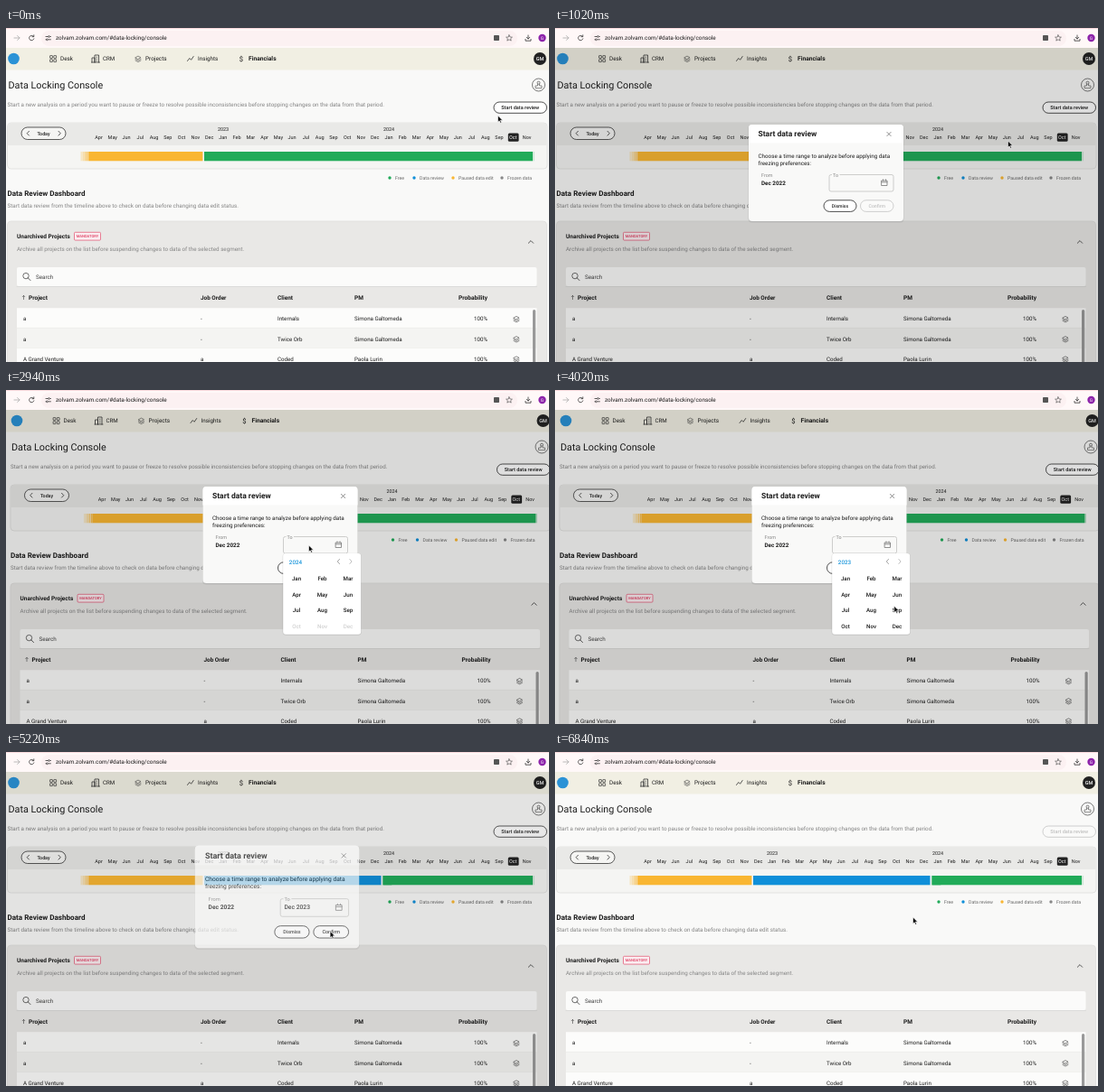
An HTML page for the animation above (6.9 s loop, 600 by 370 pixels).

```html
<!DOCTYPE html>
<html lang="en">
<head>
<meta charset="utf-8">
<title>Data Locking Console</title>
<style>
html, body { margin: 0; width: 100%; height: 100%; overflow: hidden; background: #f9f9f8; }
svg { display: block; width: 600px; height: 370px; font-family: Roboto, Inter, sans-serif; text-rendering: geometricPrecision; }
text { fill: #1c1c1c; white-space: pre; }
.m { font-weight: 500; }
.b { font-weight: 700; }
.c { text-anchor: middle; }
.e { text-anchor: end; }
text.g { fill: #858585; }
.l { fill: none; stroke: #333; stroke-width: .8; stroke-linecap: round; stroke-linejoin: round; }
.thin { stroke: #444; stroke-width: .6; }
</style>
</head>
<body>
<svg id="stage" viewBox="0 0 600 370"></svg>
<script>
const LOOP = 6900;
const MONTHS = 'Jan Feb Mar Apr May Jun Jul Aug Sep Oct Nov Dec'.split(' ');
const ORANGE = '#f9b632', GREEN = '#21ab59', BLUE = '#0f8fd9';

const text = (x, y, size, s, cls = '', more = '') =>
  `<text x="${x}" y="${y}" font-size="${size}" class="${cls}" ${more}>${s}</text>`;
const rect = (x, y, w, h, fill, r = 0, more = '') =>
  `<rect x="${x}" y="${y}" width="${w}" height="${h}" rx="${r}" fill="${fill}" ${more}/>`;
const circle = (x, y, r, fill, more = '') => `<circle cx="${x}" cy="${y}" r="${r}" fill="${fill}" ${more}/>`;
const line = (d, more = '', cls = '') => `<path class="l ${cls}" d="${d}" ${more}/>`;
const range = (n, f) => Array.from({ length: n }, (_, i) => f(i)).join('');
const layers = (x, y) => line(`M${x - 3} ${y - 1.3}l3 -1.6 3 1.6 -3 1.6zm0 1.7l3 1.6 3 -1.6m-6 1.6l3 1.6 3 -1.6`, '', 'thin');
const stroke = (color, w = .8) => `stroke="${color}" stroke-width="${w}"`;

function browser() {
  return rect(0, 0, 600, 22, '#fff8f8') + rect(0, 0, 600, 1, '#f8d9dd') +
    rect(39, 3, 526, 17, '#fcf1f2', 8.5) +
    line('M9 11h6m-2.4 -2.5l2.5 2.5 -2.5 2.5', 'style="stroke:#aaa"') +
    line('M30.4 9.3a2.7 2.7 0 1 0 .5 2.6M30.8 7.8v1.9h-1.9') +
    line('M44 9.5h2.4m2.4 0h.6M44 12.8h.6m2.4 0h2.4') +
    circle(47.5, 9.5, .9, 'none', stroke('#333', .7)) + circle(45.5, 12.8, .9, 'none', stroke('#333', .7)) +
    text(55, 13.3, 6.37, 'zolvam.zolvam.com/#data-locking/console') +
    rect(539, 8, 6, 6, '#555', .8) +
    line('M556 7.8l1 2.2 2.4 .2 -1.8 1.6 .6 2.3 -2.2 -1.3 -2.2 1.3 .6 -2.3 -1.8 -1.6 2.4 -.2z', '', 'thin') +
    line('M577 8v4m-1.8 -1.7l1.8 1.8 1.8 -1.8M574 12.4v1.8h6v-1.8') +
    circle(592.5, 11, 4.2, '#8d24aa') + text(592.5, 12.8, 4.8, 'G', 'c', 'style="fill:#fff"');
}

function nav() {
  const tile = i => rect(48.6 + i % 2 * 4.2, 30.6 + (i >> 1) * 4.2, 2.8, 2.8, 'none', .3, stroke('#333', .7));
  return rect(-6, 22, 612, 24.5, '#f1efe3') + circle(8.5, 34, 6.3, '#2b92d6') +
    range(4, tile) + text(60, 36.2, 6.35, 'Desk') +
    line('M95 38v-5h3v5m0 0v-8h4.5v8M94.5 38h9M100 32.2h.5m-.5 2h.5m-.5 2h.5') + text(107, 36.2, 6.2, 'CRM') +
    layers(146, 34) + text(154, 36.2, 6.45, 'Projects') +
    line('M200.5 36.5l2.3 -3 1.8 1.8 2.6 -3.8') + text(212, 36.2, 6.3, 'Insights') +
    text(260, 36.8, 7.6, '$', 'c') + text(268, 36.2, 6.7, 'Financials', 'b') +
    circle(590, 34, 7, '#222') + text(590, 36, 5.5, 'GM', 'c m', 'style="fill:#fff"');
}

function timeline() {
  const legend = [[424, 'Free', GREEN], [451, 'Data review', BLUE], [494, 'Paused data edit', ORANGE], [548, 'Frozen data', '#888']];
  return rect(1.5, 105, 596.5, 51, '#f5f5f3', 4, stroke('#dededc')) +
    '<path d="M1.9 130V109q0-3.600 3.600-3.600h588.500q3.600 0 3.600 3.600v21z" fill="#e9e9e7"/>' +
    rect(17, 110, 49, 13.5, '#f5f5f3', 6.75, stroke('#333')) +
    line('M25.5 114.3l-2.3 2.4 2.3 2.4M58 114.3l2.3 2.4 -2.3 2.4') +
    text(41.5, 118.7, 5.3, 'Today', 'm c') +
    text(240, 114.3, 5.4, '2023', 'c') + text(423, 114.3, 5.4, '2024', 'c') +
    rect(554.8, 116.5, 11.8, 9.2, '#222', 1.5) +
    range(32, i => text((102.5 + i * 15.26).toFixed(1), 122.8, 5.5, MONTHS[(i + 3) % 12], 'c', i == 30 ? 'style="fill:#fff"' : '')) +
    range(5, i => rect(82.5 + i * 2, 137, 1.5, 10.3, ORANGE, 0, `opacity="${.25 + i * .15}"`)) +
    rect(92, 137, 125.4, 10.3, ORANGE) + rect(219, 137, 363, 10.3, GREEN) +
    `<g id="review">${rect(218, 136.5, 199, 11.3, '#f5f5f3')}${rect(219, 137, 195.5, 10.3, BLUE)}${rect(416.3, 137, 10, 10.3, GREEN)}</g>` +
    rect(582.6, 137, .9, 10.3, GREEN, 0, 'opacity=".35"') +
    legend.map(([x, s, color]) => circle(x, 166, 1.7, color) + text(x + 6, 167.8, 5.2, s, '', 'style="fill:#666"')).join('');
}

function dashboard() {
  const rows = [['a', '-', 'Internals', 'Simona Galtomeda'], ['a', '-', 'Twice Orb', 'Simona Galtomeda'], ['A Grand Venture', 'a', 'Coded', 'Paola Lurin']];
  const cols = [19, 215, 300, 385];
  return text(1.5, 186, 8.1, 'Data Review Dashboard', 'b') +
    text(1.5, 199.3, 6.27, 'Start data review from the timeline above to check on data before changing data edit status.', 'g') +
    rect(1.5, 214, 596, 170, '#e9e8e6', 4, stroke('#dfdedc')) +
    text(12, 232.7, 6.5, 'Unarchived Projects', 'b') +
    rect(75.5, 226.3, 29, 8.8, '#fbeef1', 1, stroke('#e2506f', .7)) +
    text(90, 232.2, 4.1, 'MANDATORY', 'm c', 'style="fill:#df3c60"') +
    text(12, 247.4, 6.26, 'Archive all projects on the list before suspending changes to data of the selected segment.', 'g') +
    line('M577.3 238.3l2.7 -2.7 2.7 2.7') +
    rect(12, 265, 574.5, 21, '#fbfbfa', 2) +
    circle(22, 274.6, 3.2, 'none', stroke('#333', .7)) + line('M24.3 276.9l2.7 2.7') +
    text(33, 277.6, 6.3, 'Search', '', 'style="fill:#444"') +
    rect(12, 286.5, 574.5, 23.5, '#e9e8e6') + line('M12 286.5h574.5', 'style="stroke:#d8d8d6"') +
    line('M19.5 300.6v-4.2m-1.3 1.3l1.3 -1.3 1.3 1.3', '', 'thin') +
    text(25, 300.7, 6.5, 'Project', 'b') + text(215, 300.7, 6.4, 'Job Order', 'b') +
    text(300, 300.7, 6.5, 'Client', 'b') + text(385, 300.7, 6.5, 'PM', 'b') + text(532, 300.7, 6.6, 'Probability', 'b e') +
    rows.map((row, i) => {
      const y = 324.3 + i * 22.2;
      return rect(12, y - 14.1, 574.5, 22.2, i % 2 ? '#f4f4f2' : '#fcfcfb') +
        row.map((s, k) => text(cols[k], y, 6.2, s)).join('') + text(532, y, 6.2, '100%', 'e') + layers(564, y - 2) +
        line(`M12 ${y + 8.1}h570`, 'style="stroke:#e6e6e4"');
    }).join('') +
    rect(582, 312, 3.2, 64, '#999', 1.6);
}

function page() {
  return rect(-6, 40, 612, 335, '#f9f9f8') + nav() +
    text(2.5, 66.8, 10.8, 'Data Locking Console') +
    circle(588.5, 63, 7, '#f9f9f8', stroke('#444', .7)) +
    circle(588.5, 60.7, 1.5, 'none', stroke('#333', .6)) + line('M587.5 62.2v1.8h-2.5v2.6h7v-2.6h-2.5v-1.8', '', 'thin') +
    text(1.5, 86.6, 6.26, 'Start a new analysis on a period you want to pause or freeze to resolve possible inconsistencies before stopping changes on the data from that period.', 'g') +
    `<g id="start">${rect(539, 82, 58.5, 12.3, '#fff', 6.15, stroke('#222'))}${text(568.2, 90, 5.55, 'Start data review', 'm c')}</g>` +
    rect(538.5, 81.5, 59.5, 13.3, '#000', 6.6, 'id="hover"') +
    timeline() + dashboard() +
    rect(-6, 22, 612, 350, '#000', 0, 'id="shade"');
}

function modal() {
  return `<g id="modal">${rect(213.5, 107.5, 172, 108, '#000', 4, 'opacity=".08"')}` +
    rect(214, 107, 171, 107, '#f9f9f8', 4) + '<path d="M214 127.500V111q0-4 4-4h163q4 0 4 4v16.500z" fill="#fff"/>' +
    text(224.5, 120.3, 8.5, 'Start data review', 'b') +
    line('M366.9 115.4l4.2 4.2m0 -4.2l-4.2 4.2', '', 'thin') +
    text(224.5, 144.2, 6.27, 'Choose a time range to analyze before applying data') +
    text(224.5, 151.7, 6.27, 'freezing preferences:') +
    text(228, 165, 5.4, 'From', 'g') + text(228, 173.5, 6.3, 'Dec 2022', 'b') +
    rect(303, 162.5, 71, 18.5, 'none', 2, stroke('#c2c2c0')) + rect(306, 161.5, 8.5, 2, '#f9f9f8') +
    text(307, 165, 5.4, 'To', 'g') + text(307, 173.5, 6.35, 'Dec 2023', 'm', 'id="to"') +
    line('M361 169h6v5.5h-6zm0 1.8h6M362.5 169v-1.2m3 1.2v-1.2', 'style="stroke:#777"') +
    rect(297, 190.8, 36, 12.6, '#fff', 6.3, stroke('#222')) + text(315, 199, 5.1, 'Dismiss', 'm c') +
    `<g id="confirm">${rect(337.5, 190.8, 36.5, 12.6, '#fff', 6.3, stroke('#222'))}${text(355.8, 199, 5.2, 'Confirm', 'm c')}</g></g>`;
}

function picker() {
  return `<g id="picker">${rect(302, 180.8, 87.3, 91, '#000', 4, 'opacity=".1"')}${rect(302.7, 181, 86, 89.7, '#fff', 3)}` +
    text(309.3, 192.7, 6.3, '2024', 'm', 'id="year" style="fill:#1b97dc"') +
    line('M365 187.5l-2.2 2.5 2.2 2.5', 'style="stroke:#888"') + line('M376.4 187.5l2.2 2.5 -2.2 2.5', 'style="stroke:#aaa"') +
    MONTHS.map((s, i) => text(317.5 + i % 3 * 28.5, 211.4 + Math.floor(i / 3) * 17.5, 6.2, s, 'm c' + (i > 8 ? ' late' : ''))).join('') + '</g>';
}

const stage = document.getElementById('stage');
stage.innerHTML = `<g id="app">${page()}${modal()}${picker()}</g>${browser()}` +
  '<path id="cursor" d="M0 0V7.2L1.7 5.7 2.8 8.2 4 7.7 2.9 5.2H5.2z" fill="#000" stroke="#fff" stroke-width=".6"/>';
const el = id => document.getElementById(id);

// Pointer stops: time, x, y
const path = [
  [0, 543.5, 97], [120, 543.5, 97], [440, 555.5, 89], [820, 555.5, 89], [1420, 345, 227], [1560, 342, 227], [2020, 328.5, 189],
  [2200, 328.5, 189], [2460, 334.5, 172], [2960, 334.5, 172], [3440, 367, 188], [3740, 367, 188], [4180, 378, 261], [4420, 378, 261],
  [4780, 363.5, 214], [4860, 363.5, 214], [5080, 357, 198], [5180, 357, 198], [5320, 362.5, 201], [5880, 362.5, 201], [6120, 375, 224],
  [6500, 395.5, 183], [LOOP, 395.5, 183]
];
const ramp = (t, a, b) => Math.min(1, Math.max(0, (t - a) / (b - a)));
const ease = p => p * p * (3 - 2 * p);
const show = (id, opacity) => el(id).setAttribute('opacity', opacity);

function pointer(t) {
  const i = path.findIndex(stop => stop[0] > t);
  const [t0, x0, y0] = path[i - 1], [t1, x1, y1] = path[i];
  const p = ease(ramp(t, t0, t1));
  return [x0 + (x1 - x0) * p, y0 + (y1 - y0) * p];
}

function draw(t) {
  const open = ramp(t, 450, 630) - ramp(t, 5180, 5320);
  const zoom = 1 + .21 * (1 - open);
  const chosen = t >= 4440, lastYear = t >= 3700;
  el('app').setAttribute('transform', `translate(${t >= 2520 && t < 4500 ? 3.5 : 0} 0)`);
  el('modal').setAttribute('transform', `translate(299.5 160.5) scale(${zoom}) translate(-299.5 -160.5)`);
  show('modal', open);
  show('shade', .13 * open);
  show('hover', .38 * (ramp(t, 380, 460) - ramp(t, 640, 800)));
  show('to', chosen ? 1 : 0);
  show('confirm', chosen ? 1 : .25);
  show('picker', ramp(t, 2520, 2620) - ramp(t, 4440, 4520));
  show('review', t >= 5220 ? 1 : 0);
  show('start', 1 - .75 * ramp(t, 5200, 5430));
  el('year').textContent = lastYear ? 2023 : 2024;
  for (const node of document.querySelectorAll('.late')) node.setAttribute('opacity', lastYear ? 1 : .2);
  el('cursor').setAttribute('transform', `translate(${pointer(t)})`);
}

function tick() {
  draw(performance.now() % LOOP);
  requestAnimationFrame(tick);
}
tick();
</script>
</body>
</html>
```
